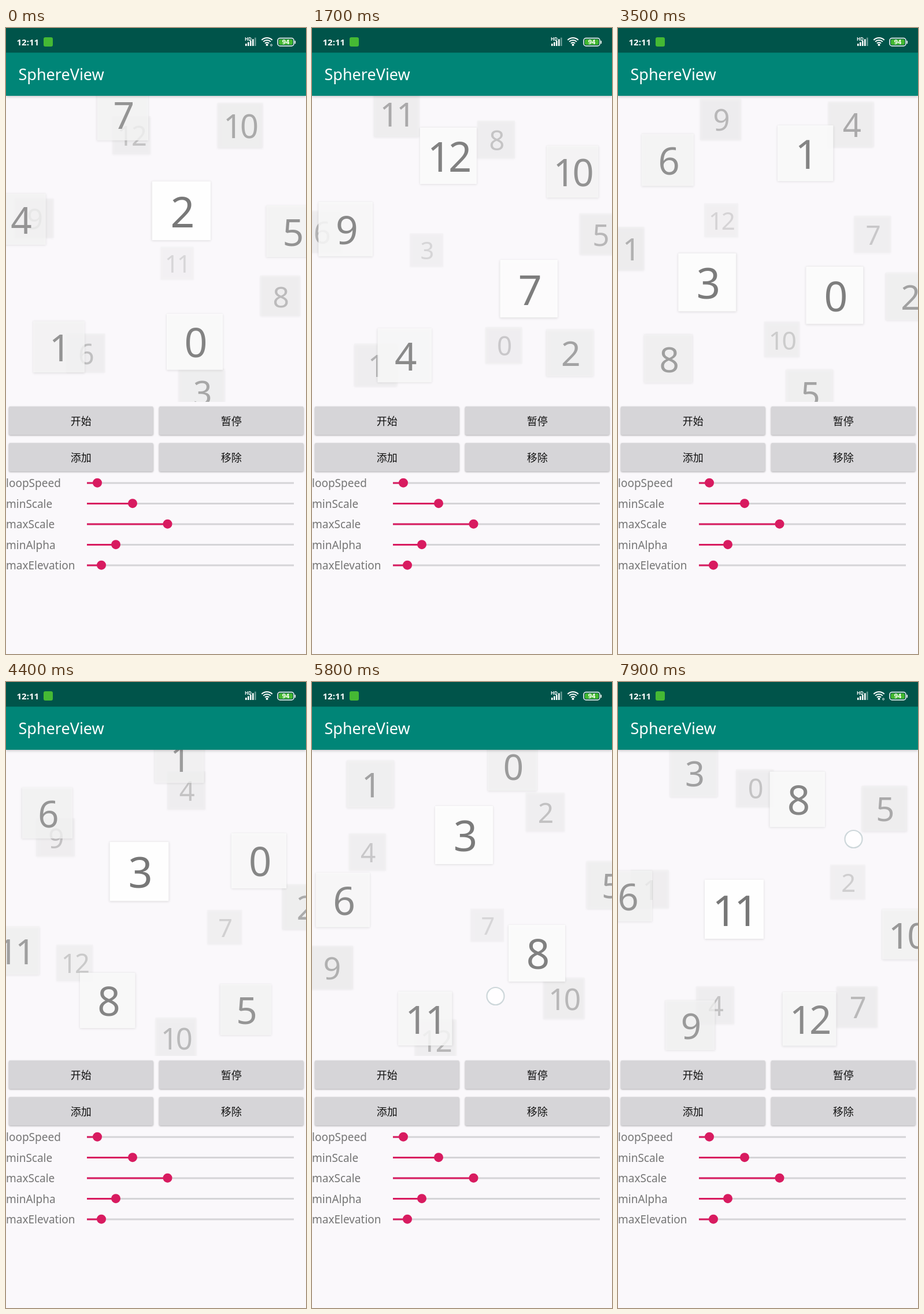
An HTML page with a canvas that plays this animation: 519x1080 px, repeating every 8000 ms.

```html
<!DOCTYPE html>
<html lang="zh">
<head>
<meta charset="utf-8">
<title>SphereView</title>
<style>
html, body { margin: 0; width: 100%; height: 100%; overflow: hidden; background: #faf8fb; }
canvas { display: block; width: 519px; height: 1080px; }
</style>
</head>
<body>
<canvas id="stage"></canvas>
<script>
const W = 519, H = 1080, LOOP = 8000, STEP = 100;
const COUNT = 13, RADIUS = 259.5, CX = 259.5, CY = 381;
const TOP = 117, BOTTOM = 645;
const GREY = '#757575', PINK = '#d81b60';
const SANS = '"Noto Sans", "Open Sans", sans-serif';
const CJK = '"Noto Sans CJK SC", "Noto Sans CJK", sans-serif';

const canvas = document.getElementById('stage');
const dpr = window.devicePixelRatio || 1;
canvas.width = W * dpr;
canvas.height = H * dpr;
const ctx = canvas.getContext('2d');

// Sphere poses: time and unit quaternion [w, x, y, z]
const poses = [
  { t: 0,    q: [0.8807, 0.4552, 0.0732, 0.1077] },
  { t: 1700, q: [0.8624, -0.2077, 0.4394, -0.1419] },
  { t: 2600, q: [0.3643, 0.3323, 0.7916, 0.3582] },
  { t: 4400, q: [-0.0025, 0.7538, 0.4541, 0.4750] },
  { t: 5800, q: [0.0002, 0.9467, 0.0178, 0.3217] },
  { t: 7000, q: [-0.3412, 0.7604, -0.3211, 0.4496] },
  { t: 7900, q: [-0.3601, 0.7672, -0.3626, 0.3876] }
];

const touches = [
  { from: 2500, to: 2800, x: 131.5, y: 570.5 },
  { from: 5700, to: 6000, x: 317.5, y: 542 },
  { from: 7800, to: 8000, x: 407.5, y: 271 }
];
const press = { from: 6900, to: 7300, x: 196, y: 689 };

const buttons = [
  { label: '开始', x: 5, y: 653 },
  { label: '暂停', x: 265, y: 653 },
  { label: '添加', x: 5, y: 716 },
  { label: '移除', x: 265, y: 716 }
];

const sliders = [
  { label: 'loopSpeed', x: 158 },
  { label: 'minScale', x: 219 },
  { label: 'maxScale', x: 279.5 },
  { label: 'minAlpha', x: 190 },
  { label: 'maxElevation', x: 165 }
];

// Points spread over the unit sphere along a golden-angle spiral
const golden = Math.PI * (3 - Math.sqrt(5));
const points = Array.from({ length: COUNT }, (_, i) => {
  const y = 1 - (2 * i + 1) / COUNT;
  const r = Math.sqrt(1 - y * y);
  return [r * Math.cos(i * golden), y, -r * Math.sin(i * golden)];
});

const active = (span, t) => t >= span.from && t < span.to;

function slerp(a, b, k) {
  let dot = a.reduce((sum, v, i) => sum + v * b[i], 0);
  const sign = dot < 0 ? -1 : 1;
  dot = Math.min(1, dot * sign);
  const angle = Math.acos(dot);
  if (angle < 1e-4) return a;
  const s = Math.sin(angle);
  const ka = Math.sin((1 - k) * angle) / s;
  const kb = sign * Math.sin(k * angle) / s;
  return a.map((v, i) => v * ka + b[i] * kb);
}

function poseAt(t) {
  const n = poses.findIndex(p => p.t > t);
  if (n < 0) return poses[poses.length - 1].q;
  const a = poses[n - 1], b = poses[n];
  return slerp(a.q, b.q, (t - a.t) / (b.t - a.t));
}

function rotate([w, x, y, z], [px, py, pz]) {
  const tx = 2 * (y * pz - z * py);
  const ty = 2 * (z * px - x * pz);
  const tz = 2 * (x * py - y * px);
  return [
    px + w * tx + y * tz - z * ty,
    py + w * ty + z * tx - x * tz,
    pz + w * tz + x * ty - y * tx
  ];
}

function rect(x, y, w, h, color) {
  ctx.fillStyle = color;
  ctx.fillRect(x, y, w, h);
}

function roundRect(x, y, w, h, r) {
  ctx.beginPath();
  ctx.roundRect(x, y, w, h, r);
}

function disc(x, y, r, color) {
  ctx.fillStyle = color;
  ctx.beginPath();
  ctx.arc(x, y, r, 0, Math.PI * 2);
  ctx.fill();
}

function text(str, x, y, font, color, align = 'left') {
  ctx.font = font;
  ctx.fillStyle = color;
  ctx.textAlign = align;
  ctx.fillText(str, x, y);
}

function shadow(color, blur, dy) {
  ctx.shadowColor = color;
  ctx.shadowBlur = blur * dpr;
  ctx.shadowOffsetY = dy * dpr;
}

function drawCard({ label, x, y, z }) {
  const size = 80 + 23 * z;
  const px = CX + x * RADIUS, py = CY + y * RADIUS;
  const left = px - size / 2, top = py - size / 2;
  ctx.save();
  ctx.globalAlpha = 0.6 + 0.4 * z;
  ctx.save();
  shadow('#000', 4, 1);
  rect(left, top, size, size, 'rgba(0,0,0,0.12)');
  ctx.restore();
  rect(left, top, size, size, '#fff');
  const font = size * 0.72;
  ctx.letterSpacing = -font * 0.06 + 'px';
  text(label, px, py + size * 0.28, `${font}px ${SANS}`, GREY, 'center');
  ctx.restore();
}

function drawSphere(t) {
  const q = poseAt(t);
  const cards = points.map((p, i) => {
    const [x, y, z] = rotate(q, p);
    return { label: String(i), x, y, z };
  });
  cards.sort((a, b) => a.z - b.z);
  ctx.save();
  ctx.beginPath();
  ctx.rect(0, TOP, W, BOTTOM - TOP);
  ctx.clip();
  cards.forEach(drawCard);
  ctx.restore();
}

function drawWifi(busy) {
  ctx.strokeStyle = '#fff';
  ctx.lineWidth = 2;
  for (const r of [5, 9, 13]) {
    ctx.beginPath();
    ctx.arc(451.5, 30, r, -Math.PI * 0.75, -Math.PI * 0.25);
    ctx.stroke();
  }
  disc(451.5, 29, 2, '#fff');
  if (busy) {
    ctx.lineWidth = 1;
    ctx.beginPath();
    ctx.arc(459, 29.5, 1.5, 0, Math.PI * 2);
    ctx.stroke();
  }
}

function drawBattery() {
  ctx.strokeStyle = '#fff';
  ctx.lineWidth = 1.5;
  roundRect(470, 17.5, 28, 13.5, 4);
  ctx.stroke();
  rect(499.5, 22, 1.5, 5, '#fff');
  ctx.fillStyle = '#43b82f';
  roundRect(472, 19.5, 24, 9.5, 2);
  ctx.fill();
  text('94', 484, 28.3, `bold 11px ${SANS}`, '#fff', 'center');
}

function drawBars(t) {
  ctx.save();
  shadow('rgba(0,0,0,0.25)', 5, 1);
  rect(0, 42, W, 75, '#008577');
  ctx.restore();
  rect(0, 0, W, 42.5, '#00544a');

  text('12:11', 18.5, 30, `600 15px ${SANS}`, '#fff');
  ctx.fillStyle = '#45b934';
  roundRect(65, 16, 16, 16, 3);
  ctx.fill();

  text('HD', 413, 22, `bold 8px ${SANS}`, '#fff');
  for (let i = 0; i < 5; i++) {
    const h = 4 + i * 2.6;
    rect(414 + i * 4, 31 - h, 2.6, h, i < 4 ? '#fff' : 'rgba(255,255,255,0.4)');
  }
  drawWifi(t < 900 || t >= 7300);
  drawBattery();
  text('SphereView', 21.5, 90, `500 27px ${SANS}`, '#fff');
}

function drawButton({ label, x, y }, pressed) {
  ctx.save();
  shadow('rgba(0,0,0,0.32)', pressed ? 5 : 3, 1);
  ctx.fillStyle = pressed ? '#b9b8ba' : '#d6d5d8';
  roundRect(x, y, 249.5, 49, 2);
  ctx.fill();
  ctx.restore();
  if (pressed) disc(press.x, press.y, 14, 'rgba(255,255,255,0.14)');
  text(label, x + 124.8, y + 31.5, `500 18px ${CJK}`, '#111', 'center');
}

function drawSlider({ label, x }, i) {
  const y = 785 + i * 35.5;
  text(label, 0, y + 7, `19px ${SANS}`, GREY);
  rect(140, y - 1.5, 358, 3, '#d5d4d7');
  rect(140, y - 1.5, x - 140, 3, PINK);
  disc(x, y - 0.3, 8, PINK);
}

function drawTouch({ x, y }) {
  disc(x, y, 15, 'rgba(255,255,255,0.85)');
  ctx.strokeStyle = '#cdd7da';
  ctx.lineWidth = 2.2;
  ctx.stroke();
}

function draw(t) {
  ctx.setTransform(dpr, 0, 0, dpr, 0, 0);
  rect(0, 0, W, H, '#faf8fb');
  drawSphere(t);
  drawBars(t);
  buttons.forEach((b, i) => drawButton(b, i === 0 && active(press, t)));
  sliders.forEach(drawSlider);
  touches.filter(p => active(p, t)).forEach(drawTouch);
}

const start = performance.now();
function frame() {
  const t = (performance.now() - start) % LOOP;
  draw(Math.floor(t / STEP) * STEP);
  requestAnimationFrame(frame);
}
frame();
</script>
</body>
</html>
```
